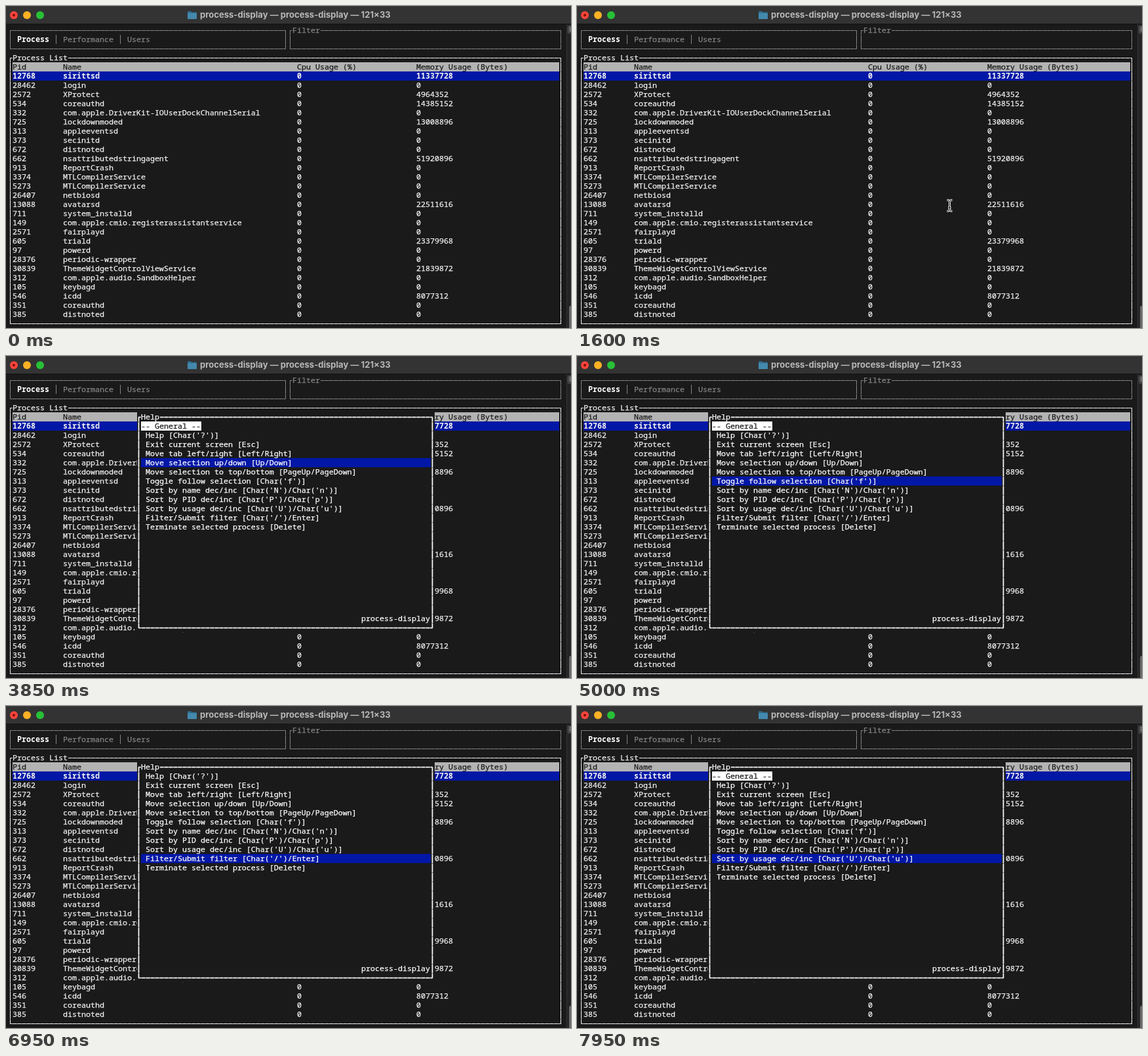
An HTML page that plays this animation: 862 by 492 pixels, repeating every 8000 ms.

```html
<!DOCTYPE html>
<html lang="en">
<head>
<meta charset="utf-8">
<title>process-display</title>
<style>
  html, body { margin: 0; width: 100%; height: 100%; overflow: hidden; background: #1a1a1a; }
  svg { display: block; width: 862px; height: 492px; }
  text { white-space: pre; }
  .mono { font: 500 11.667px "Noto Sans Mono", "DejaVu Sans Mono", monospace; stroke-width: 0.25px; }
  .bold { font-weight: 700; stroke-width: 0; }
  .title { font: 700 13.07px Inter, "Open Sans", sans-serif; }
</style>
</head>
<body>
<svg id="stage" viewBox="0 0 862 492"></svg>
<script>
const LOOP = 8000;
const CELL_W = 7, CELL_H = 14;
const BG = '#1a1a1a', FG = '#f2f2f2', DIM = '#858585', BLUE = '#0217a6', BAR = '#b3b3b3';

const processes = `12768 sirittsd 11337728
28462 login 0
2572 XProtect 4964352
534 coreauthd 14385152
332 com.apple.DriverKit-IOUserDockChannelSerial 0
725 lockdownmoded 13008896
313 appleeventsd 0
373 secinitd 0
672 distnoted 0
662 nsattributedstringagent 51920896
913 ReportCrash 0
3374 MTLCompilerService 0
5273 MTLCompilerService 0
26407 netbiosd 0
13088 avatarsd 22511616
711 system_installd 0
149 com.apple.cmio.registerassistantservice 0
2571 fairplayd 0
605 triald 23379968
97 powerd 0
28376 periodic-wrapper 0
30839 ThemeWidgetControlViewService 21839872
312 com.apple.audio.SandboxHelper 0
105 keybagd 0
546 icdd 8077312
351 coreauthd 0
385 distnoted 0`.split('\n').map(line => line.split(' '));

const helpItems = [
  '-- General --',
  "Help [Char('?')]",
  'Exit current screen [Esc]',
  'Move tab left/right [Left/Right]',
  'Move selection up/down [Up/Down]',
  'Move selection to top/bottom [PageUp/PageDown]',
  "Toggle follow selection [Char('f')]",
  "Sort by name dec/inc [Char('N')/Char('n')]",
  "Sort by PID dec/inc [Char('P')/Char('p')]",
  "Sort by usage dec/inc [Char('U')/Char('u')]",
  "Filter/Submit filter [Char('/')/Enter]",
  'Terminate selected process [Delete]'
];

// Key presses: time in ms and the direction of the step
const HELP_OPENS = 1800;
const keys = [
  [3200, 1], [3400, 1], [3700, 1], [4200, 1], [5000, 1], [5400, 1],
  [5800, 1], [6200, 1], [6450, 1], [7100, 1], [7400, -1], [7750, -1]
];
const LAST_FIXED_ROW = 9;

const stage = document.getElementById('stage');

function add(parent, tag, attrs, content) {
  const node = document.createElementNS('http://www.w3.org/2000/svg', tag);
  for (const name in attrs) node.setAttribute(name, attrs[name]);
  if (content !== undefined) node.textContent = content;
  parent.appendChild(node);
  return node;
}

const colX = col => 3 + col * CELL_W;
const rowY = row => 30 + row * CELL_H;

function fillCells(parent, col, row, cols, fill) {
  return add(parent, 'rect', {
    x: colX(col), y: rowY(row), width: cols * CELL_W + 1, height: CELL_H, fill
  });
}

function print(parent, col, row, content, fill = FG, bold = false) {
  return add(parent, 'text', {
    x: colX(col), y: rowY(row) + 11, fill, stroke: fill, class: bold ? 'mono bold' : 'mono'
  }, content);
}

// A frame through the cell centres, with faint seams between the cells
function frame(parent, col0, row0, col1, row1, stroke, width, title) {
  const x0 = colX(col0) + 3.5, x1 = colX(col1) + 3.5;
  const y0 = rowY(row0) + 7.5, y1 = rowY(row1) + 7.5;
  const common = { stroke, 'stroke-width': width, fill: 'none' };
  add(parent, 'path', { ...common, opacity: 0.55, d: `M${x0} ${y0}H${x1}V${y1}H${x0}Z` });
  add(parent, 'path', {
    ...common, d: `M${x0} ${y0}H${x1}M${x0} ${y1}H${x1}`,
    'stroke-dasharray': '6 1', 'stroke-dashoffset': 3
  });
  add(parent, 'path', {
    ...common, d: `M${x0} ${y0}V${y1}M${x1} ${y0}V${y1}`,
    'stroke-dasharray': '13 1', 'stroke-dashoffset': 6.5
  });
  if (title) {
    fillCells(parent, col0 + 1, row0, title.length, BG);
    print(parent, col0 + 1, row0, title, stroke);
  }
}

function drawWindow() {
  add(stage, 'rect', { width: 862, height: 492, fill: BG });
  // Neighbouring window at the right edge
  add(stage, 'rect', { x: 855, y: 28, width: 7, height: 464, fill: '#242424' });
  add(stage, 'rect', { x: 855, y: 28, width: 1, height: 464, fill: '#353535' });
  add(stage, 'rect', { x: 857.5, y: 30.5, width: 8, height: 11, rx: 1, fill: '#3a3a3a', stroke: '#5a5a5a' });
  add(stage, 'text', { x: 859, y: 39, fill: '#a8a8a8', 'font-size': 9, 'font-family': 'Inter, sans-serif' }, 'E');
  add(stage, 'rect', { x: 859, y: 458, width: 8, height: 40, rx: 3, fill: '#686868' });

  add(stage, 'rect', { width: 862, height: 28, fill: '#333333' });
  add(stage, 'rect', { width: 862, height: 1, fill: '#3e3e3e' });
  add(stage, 'rect', { y: 27, width: 862, height: 1, fill: '#101010' });
  ['#fe453b', '#fdb124', '#27c136'].forEach((fill, i) =>
    add(stage, 'circle', { cx: 12 + 20 * i, cy: 14, r: 6, fill }));
  add(stage, 'circle', { cx: 12, cy: 14, r: 2, fill: '#7a0c08' });
  add(stage, 'path', { d: 'M277 9q0-1 1-1h4l1.500 1.500h6.500q1 0 1 1V19q0 1-1 1h-12q-1 0-1-1Z', fill: '#2f6f92' });
  add(stage, 'rect', { x: 277, y: 11, width: 14, height: 9, rx: 1, fill: '#4389ad' });
  add(stage, 'text', { x: 296, y: 18, fill: '#b8b8b8', class: 'title' },
    'process-display — process-display — 121×33');
}

function drawTable() {
  frame(stage, 0, 0, 60, 2, DIM, 1);
  print(stage, 2, 1, 'Process', '#ffffff', true);
  print(stage, 12, 1, 'Performance', DIM);
  print(stage, 26, 1, 'Users', DIM);
  for (const col of [10, 24])
    add(stage, 'rect', { x: colX(col) + 3, y: rowY(1), width: 1, height: CELL_H, fill: DIM });
  frame(stage, 61, 0, 120, 2, DIM, 1, 'Filter');

  frame(stage, 0, 3, 120, 32, FG, 1, 'Process List');
  fillCells(stage, 1, 4, 119, BAR);
  fillCells(stage, 1, 5, 119, BLUE);
  const columns = [1, 12, 63, 89];
  ['Pid', 'Name', 'Cpu Usage (%)', 'Memory Usage (Bytes)'].forEach((label, i) =>
    print(stage, columns[i], 4, label, BG));
  processes.forEach(([pid, name, memory], r) =>
    [pid, name, '0', memory].forEach((value, i) =>
      print(stage, columns[i], 5 + r, value, FG, r === 0)));
}

function drawHelp() {
  const group = add(stage, 'g', {});
  add(group, 'rect', {
    x: colX(28) + 1, y: rowY(4), width: 65 * CELL_W - 1, height: 24 * CELL_H, fill: BG
  });
  frame(group, 28, 4, 92, 27, '#ffffff', 1.5, 'Help');
  print(group, 77, 26, 'process-display', '#ffffff');
  const head = add(group, 'g', {});
  fillCells(head, 29, 5, helpItems[0].length, '#ffffff');
  print(head, 29, 5, helpItems[0], BG);
  const bar = fillCells(group, 29, 5, 63, BLUE);
  const list = add(group, 'g', {});
  helpItems.slice(1).forEach((item, i) => print(list, 30, 6 + i, item, '#ffffff'));
  return { group, head, bar, list };
}

function drawPointer() {
  const group = add(stage, 'g', {});
  const d = 'M-4-8.500Q-.5-8.500 0-6Q.5-8.500 4-8.500M0-6V6M-4 8.500Q-.5 8.500 0 6Q.5 8.500 4 8.500M-2.500 3H2.500';
  add(group, 'path', { d, fill: 'none', stroke: '#f4f4f4', 'stroke-width': 3 });
  add(group, 'path', { d, fill: 'none', stroke: '#111111', 'stroke-width': 1 });
  return group;
}

drawWindow();
drawTable();
const help = drawHelp();
const pointer = drawPointer();

function show(node, on) {
  node.setAttribute('display', on ? 'inline' : 'none');
}

function render(t) {
  const open = t >= HELP_OPENS;
  const selected = keys.reduce((sum, [time, step]) => sum + (t >= time ? step : 0), 1);
  const scroll = Math.max(0, selected - LAST_FIXED_ROW);
  show(help.group, open);
  show(help.head, scroll === 0);
  help.bar.setAttribute('y', rowY(5 + selected - scroll));
  // The top item leaves the view once the list has scrolled past it
  help.list.setAttribute('transform', `translate(0 ${-scroll * CELL_H})`);
  show(help.list.firstChild, scroll < 2);

  // The pointer glides in from the lower right and hides on the first key press
  show(pointer, t >= 500 && !open);
  const p = Math.min(1, Math.max(0, (t - 500) / 1050));
  const rest = (1 - p) ** 3;
  pointer.setAttribute('transform', `translate(${568.5 + 172 * rest} ${305 + 165 * rest})`);
}

function tick() {
  render(performance.now() % LOOP);
  requestAnimationFrame(tick);
}
tick();
</script>
</body>
</html>
```
